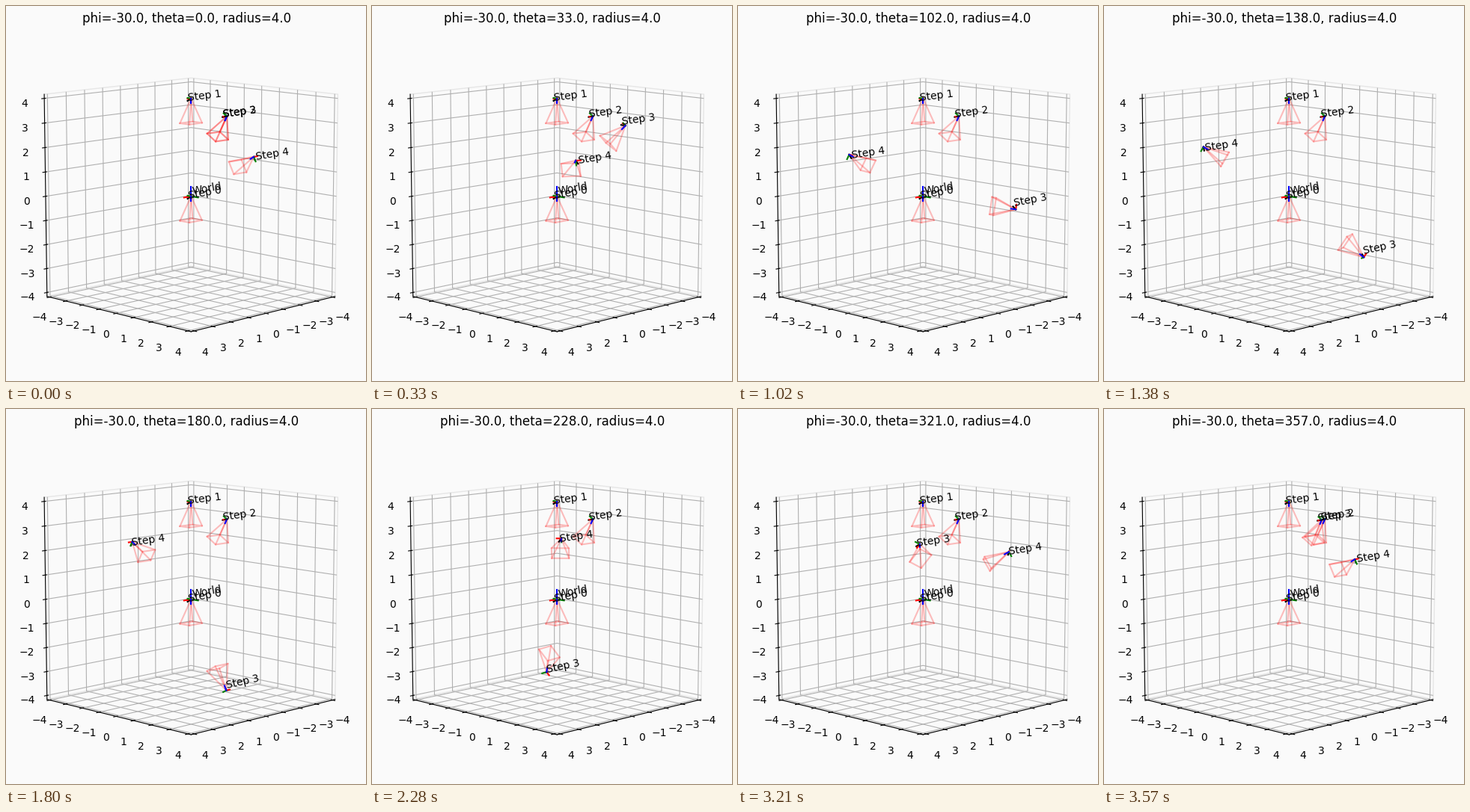
Write a matplotlib script that moves like this. It is 481 by 502 pixels and loops after 3600 ms.

```python
import numpy as np
import matplotlib.pyplot as plt
from matplotlib.animation import FuncAnimation

WIDTH, HEIGHT, DPI = 481, 502, 100
FRAMES, INTERVAL = 120, 30
PHI, RADIUS = -30.0, 4.0
BACKGROUND = "#fafafa"

# Camera space: x right, y down, z forward.
FLIP = np.diag([1.0, -1.0, -1.0])
SWAP = np.array([[-1.0, 0, 0], [0, 0, 1], [0, 1, 0]])
HALF_W, HALF_H = 0.36, 0.27
RIM = np.array([[sx * HALF_W, sy * HALF_H, 1.0]
                for sx, sy in ((1, 1), (1, -1), (-1, -1), (-1, 1), (1, 1))])
APEX = np.zeros(3)
LABEL = np.full(3, 0.1)


def rot_phi(deg):
    c, s = np.cos(np.radians(deg)), np.sin(np.radians(deg))
    return np.array([[1, 0, 0], [0, c, -s], [0, s, c]])


def rot_theta(deg):
    c, s = np.cos(np.radians(deg)), np.sin(np.radians(deg))
    return np.array([[c, 0, -s], [0, 1, 0], [s, 0, c]])


class Frame:
    """Coloured axes with a label and, for cameras, a view frustum."""

    def __init__(self, ax, name, size, camera=True):
        self.parts = []
        if camera:
            for points in [RIM] + [np.array([APEX, p]) for p in RIM[:4]]:
                self.add_line(ax, points, color="red", alpha=0.25)
            self.add_line(ax, np.array([APEX, LABEL]), color="black")
        for tip, color in zip(np.eye(3) * size, ("red", "green", "blue")):
            self.add_line(ax, np.array([APEX, tip]), color=color)
        self.text = ax.text(0, 0, 0, name, zdir="x")

    def add_line(self, ax, points, **style):
        line, = ax.plot(*points.T, linewidth=1.5, **style)
        self.parts.append((line, points))

    def place(self, rotation, position):
        for line, points in self.parts:
            line.set_data_3d(*(points @ rotation.T + position).T)
        self.text.set_position_3d(rotation @ LABEL + position, zdir="x")


def place_camera(camera, rotation, radius=RADIUS):
    camera.place(rotation @ FLIP, rotation @ np.array([0, 0, radius]))


# The tiny surplus keeps the pixel size from rounding down.
fig = plt.figure(figsize=((WIDTH + 1e-6) / DPI, (HEIGHT + 1e-6) / DPI),
                 dpi=DPI, facecolor=BACKGROUND)
ax = fig.add_axes([10 / WIDTH, 10 / HEIGHT, 462 / WIDTH, 462 / HEIGHT],
                  projection="3d", facecolor=BACKGROUND)
ax.set_box_aspect((1, 1, 1))
ax.view_init(elev=10, azim=45)

world = Frame(ax, "World", 0.4, camera=False)
steps = [Frame(ax, f"Step {n}", 0.2) for n in range(5)]
world.place(np.eye(3), np.zeros(3))
place_camera(steps[0], np.eye(3), 0)
place_camera(steps[1], np.eye(3))
place_camera(steps[2], rot_phi(PHI))

limit = 4 * 25 / 24
ax.set(xlim=(-limit, limit), ylim=(-limit, limit), zlim=(-limit, limit))
for axis in (ax.xaxis, ax.yaxis, ax.zaxis):
    axis.set_ticks(range(-4, 5))
    axis.pane.set(fill=False, edgecolor="#e6e6e6", alpha=1)
title = ax.set_title("")


def update(i):
    theta = i * 360 / FRAMES
    orbit = rot_theta(theta) @ rot_phi(PHI)
    place_camera(steps[3], orbit)
    place_camera(steps[4], SWAP @ orbit)
    title.set_text(f"phi={PHI:.1f}, theta={theta:.1f}, radius={RADIUS:.1f}")
    return []


anim = FuncAnimation(fig, update, frames=FRAMES, interval=INTERVAL,
                     repeat=True, repeat_delay=0)
plt.show()
```
